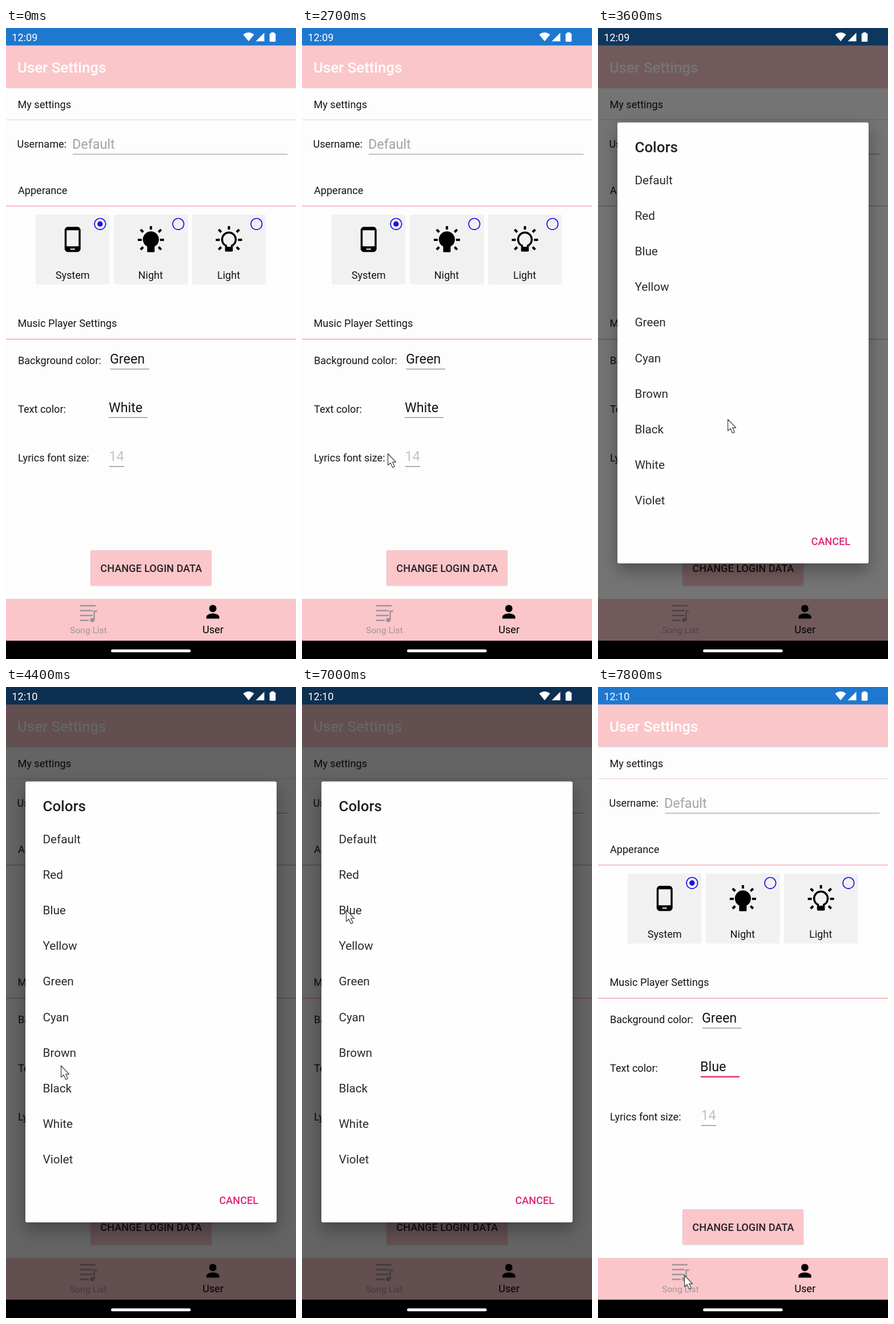
Animation of 508x1102 px, one loop 8 s. Source, as an HTML page:

```html
<!DOCTYPE html>
<html lang="en">
<head>
<meta charset="utf-8">
<title>User Settings</title>
<style>
html, body { margin: 0; width: 100%; height: 100%; overflow: hidden; background: #000; }
svg { display: block; width: 100vw; height: 100vh; }
text { font: 400 18.1px Roboto, "Noto Sans", sans-serif; fill: #151515; white-space: pre; }
.mid { text-anchor: middle; }
.field { font-size: 23.3px; }
.hint { fill: #a5a3a5; }
.title { font-size: 25.87px; font-weight: 500; }
.btn { font-weight: 500; fill: #2a2123; }
.small { font-size: 15.5px; fill: #a0949a; }
.item { font-size: 20.7px; fill: #2b2b2b; }
.bar { fill: #fac6ca; }
.under { stroke: #8b898b; stroke-width: 1.3; }
.accent { stroke: #e0357a; stroke-width: 2.6; }
.card { fill: #f2f1f1; }
.radio { fill: none; stroke: #1c12e6; stroke-width: 1.7; }
.sheet { fill: #fffefe; filter: drop-shadow(0 12px 14px rgba(0, 0, 0, .32)); }
.toolbar { filter: drop-shadow(0 1.5px 1.5px rgba(0, 0, 0, .22)); }
.button { filter: drop-shadow(0 1px 1px rgba(0, 0, 0, .15)); }

/* one percent is 80 ms, one step is 100 ms */
.anim { animation: 8s step-end infinite; }
#dim { animation-name: dim; }
#dialog { animation-name: dialog; }
#clockA { animation-name: clockA; }
#clockB { animation-name: clockB; }
#valueA { animation-name: valueA; }
#valueB { animation-name: valueB; }
#focusOff { animation-name: focusOff; }
#focusOn { animation-name: focusOn; }
#cursor { animation-name: cursor; }

@keyframes dim {
  0% { opacity: 0; }
  42.5% { opacity: .12; }
  43.75% { opacity: .34; }
  45% { opacity: .54; }
  46.25% { opacity: .605; }
  88.75% { opacity: .255; }
  90% { opacity: .06; }
  91.25%, 100% { opacity: 0; }
}
@keyframes dialog {
  0% { opacity: 0; }
  42.5% { opacity: .25; }
  43.75% { opacity: .8; }
  45% { opacity: 1; }
  88.75% { opacity: .2; }
  90%, 100% { opacity: 0; }
}
@keyframes clockA { 0% { opacity: 1; } 53.75%, 100% { opacity: 0; } }
@keyframes clockB { 0% { opacity: 0; } 53.75%, 100% { opacity: 1; } }
@keyframes valueA { 0% { opacity: 1; } 88.75%, 100% { opacity: 0; } }
@keyframes valueB { 0% { opacity: 0; } 88.75%, 100% { opacity: 1; } }
@keyframes focusOff { 0% { opacity: 1; } 42.5%, 100% { opacity: 0; } }
@keyframes focusOn { 0% { opacity: 0; } 42.5%, 100% { opacity: 1; } }
@keyframes cursor {
  0% { visibility: hidden; transform: translate(150px, 743px); }
  33.75% { visibility: visible; transform: translate(150px, 743px); animation-timing-function: steps(3); }
  37.5% { visibility: visible; transform: translate(261px, 648px); animation-timing-function: steps(2); }
  40% { visibility: visible; transform: translate(227px, 683px); }
  46.25% { visibility: visible; transform: translate(227px, 683px); animation-timing-function: steps(7); }
  55% { visibility: visible; transform: translate(96px, 661px); }
  65% { visibility: visible; transform: translate(96px, 661px); animation-timing-function: steps(10); }
  77.5% { visibility: visible; transform: translate(87px, 488px); animation-timing-function: steps(8); }
  87.5% { visibility: visible; transform: translate(77px, 389px); }
  88.75% { visibility: visible; transform: translate(84px, 421px); animation-timing-function: steps(5); }
  95% { visibility: visible; transform: translate(149px, 1024px); }
  97.5%, 100% { visibility: visible; transform: translate(151px, 1027px); }
}
</style>
</head>
<body>
<svg viewBox="0 0 508 1102" preserveAspectRatio="none">
  <defs>
    <g id="rays" fill="none" stroke="#000" stroke-width="4">
      <path d="M0-24v6M-23 0h7M16 0h7M-18-18l4.5 4.5M18-18l-4.5 4.5M-18 17l4.5-4.5M18 17l-4.5-4.5"/>
    </g>
    <path id="bulb" d="M-5.5 20.5V11A13 13 0 1 1 5.5 11V20.5Z"/>
  </defs>

  <rect width="508" height="1102" fill="#fefdfe"/>
  <rect class="bar toolbar" y="30" width="508" height="73.5"/>
  <rect width="508" height="30.5" fill="#1f78d0"/>
  <text class="title" x="20" y="78" style="fill:#fff">User Settings</text>

  <text x="20.5" y="139.5">My settings</text>
  <path d="M0 160.3H508" stroke="#fad9de" stroke-width="1.4"/>
  <text x="19.5" y="209">Username:</text>
  <text class="field hint" x="116" y="210.5">Default</text>
  <path class="under" d="M117 220.3H493" style="stroke:#a3a1a3"/>

  <text x="21" y="289.5">Apperance</text>
  <path d="M0 311H508" stroke="#f5aab4" stroke-width="1.5"/>
  <rect class="card" x="52" y="326" width="129.5" height="122" rx="3"/>
  <rect class="card" x="189" y="326" width="129.5" height="122" rx="3"/>
  <rect class="card" x="326" y="326" width="129.5" height="122" rx="3"/>
  <path transform="translate(92.7 345.3) scale(2)" fill-rule="evenodd" d="M16 1H8C6.34 1 5 2.34 5 4v16c0 1.66 1.34 3 3 3h8c1.66 0 3-1.34 3-3V4c0-1.66-1.34-3-3-3zm-2 20h-4v-1h4v1zm3.25-3H6.75V4h10.5v14z"/>
  <g transform="translate(253.8 370)">
    <use href="#rays"/>
    <use href="#bulb" stroke="#000" stroke-width="2" stroke-linejoin="round"/>
  </g>
  <g transform="translate(390.5 370)">
    <use href="#rays"/>
    <use href="#bulb" fill="none" stroke="#000" stroke-width="3.8" stroke-linejoin="round" transform="scale(.92)"/>
    <path d="M-5 12h10v8H-5z"/>
  </g>
  <circle class="radio" cx="164.8" cy="342.3" r="9.8"/>
  <circle cx="164.8" cy="342.3" r="4.7" fill="#1c12e6"/>
  <circle class="radio" cx="301.8" cy="342.3" r="9.8"/>
  <circle class="radio" cx="438.8" cy="342.3" r="9.8"/>
  <text class="mid" x="116.7" y="437.5">System</text>
  <text class="mid" x="253.3" y="437.5">Night</text>
  <text class="mid" x="390" y="437.5">Light</text>

  <text x="20.5" y="522.3">Music Player Settings</text>
  <path d="M0 543.5H508" stroke="#f0a0ab" stroke-width="1.5"/>
  <text x="21" y="587">Background color:</text>
  <text class="field" x="182" y="586">Green</text>
  <path class="under" d="M182.5 595.6H251"/>
  <text x="21" y="671.7">Text color:</text>
  <g id="valueA" class="anim"><text class="field" x="180" y="671">White</text></g>
  <g id="valueB" class="anim"><text class="field" x="179" y="671">Blue</text></g>
  <path id="focusOff" class="under anim" d="M180 680.3H248"/>
  <path id="focusOn" class="accent anim" d="M180 680.8H248"/>
  <text x="21" y="756.7">Lyrics font size:</text>
  <text class="field" x="180.5" y="756" style="fill:#c3c1c3">14</text>
  <path class="under" d="M180.5 765.8H207"/>

  <rect class="bar button" x="148" y="912" width="212" height="61.5" rx="2.5"/>
  <text class="btn mid" x="254.3" y="950">CHANGE LOGIN DATA</text>

  <rect class="bar" y="997" width="508" height="73"/>
  <g fill="none" stroke="#a0949a" stroke-width="2.4">
    <path d="M129.5 1009H157M129.5 1017.5H152M129.5 1026H152M129.5 1034.5H145M154.5 1034V1018.5H159.5"/>
    <circle cx="151" cy="1034" r="3.8" fill="#a0949a" stroke="none"/>
  </g>
  <text class="small mid" x="144.5" y="1056.5">Song List</text>
  <circle cx="362.3" cy="1013.8" r="6.4"/>
  <path d="M351 1031.5v-3c0-4 7-6 11.3-6s11.3 2 11.3 6v3z"/>
  <text class="mid" x="362.7" y="1056.5" style="fill:#000">User</text>

  <rect id="dim" class="anim" width="508" height="1070"/>

  <g id="dialog" class="anim">
    <rect class="sheet" x="34" y="165" width="440" height="770" rx="3"/>
    <text class="title" x="64.5" y="216.5" style="fill:#212121">Colors</text>
    <g id="items"></g>
    <text class="btn" x="373.5" y="902.5" style="fill:#e0257a">CANCEL</text>
  </g>

  <g id="status" fill="#fff">
    <g id="clockA" class="anim"><text x="10.3" y="22.7" style="fill:#fff">12:09</text></g>
    <g id="clockB" class="anim"><text x="10.3" y="22.7" style="fill:#fff">12:10</text></g>
    <path d="M415.5 11.5Q425 4 434.500 11.500L425 23.300ZM437.500 23.200L452.500 8.300V23.200Z"/>
    <path d="M464.500 7.500h5v1.800h1.500q1.300 0 1.300 1.300v12q0 1.300-1.300 1.300h-8q-1.300 0-1.300-1.300v-12q0-1.300 1.300-1.300h1.500z"/>
  </g>
  <rect y="1070" width="508" height="32"/>
  <rect x="184" y="1085.300" width="139.500" height="5" rx="2.500" fill="#fff"/>

  <g id="cursor" class="anim">
    <path d="M.5.5V20.500L5 16.500L8.700 24.500L12.300 22.800L8.700 15.200H14.500Z" fill="#fff" stroke="#3a3a42" stroke-width="1.200" stroke-linejoin="round"/>
  </g>
</svg>
<script>
const colors = "Default Red Blue Yellow Green Cyan Brown Black White Violet".split(" ");
document.getElementById("items").innerHTML = colors
  .map((name, i) => `<text class="item" x="64.5" y="${273 + i * 62.1}">${name}</text>`)
  .join("");
</script>
</body>
</html>
```
